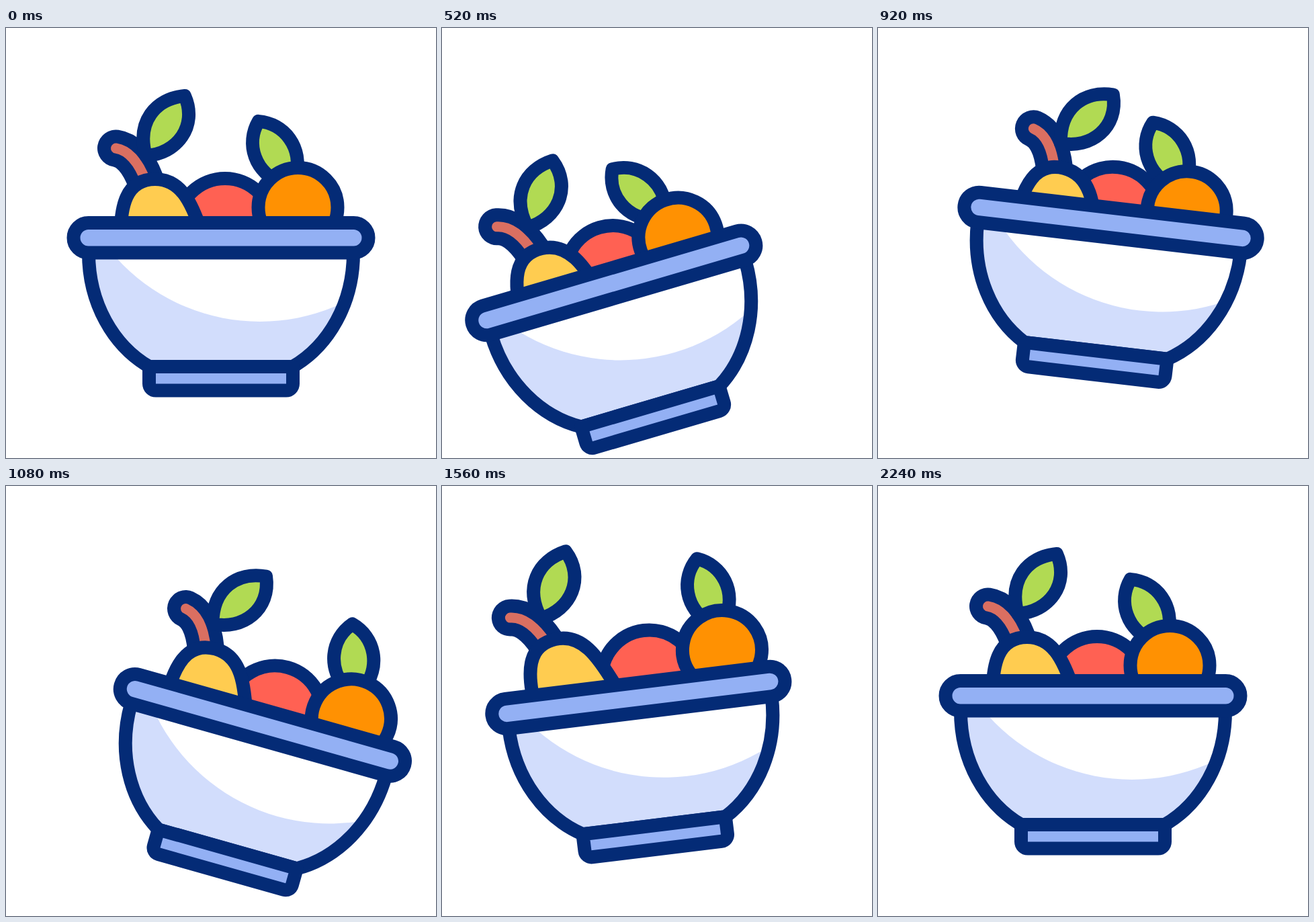
An HTML page that plays this animation: 640x640 px, repeating every 2400 ms.

```html
<!DOCTYPE html>
<html lang="en">
<head>
<meta charset="utf-8">
<title>Fruit bowl</title>
<style>
  html, body { margin: 0; width: 100%; height: 100%; overflow: hidden; background: #fff; }
  svg { display: block; width: 100%; height: 100%; }
  .line { stroke: #042b76; stroke-width: 20; stroke-linejoin: round; }
  .stem { fill: none; stroke-linecap: round; }
  .leaf { fill: #b1da53; }
  .trim { fill: #93b0f4; }
</style>
</head>
<body>
<svg viewBox="0 0 640 640">
  <defs>
    <path id="body" d="M123 325V335C123 410 160 473 213 504H427C480 473 517 410 517 335V325Z"/>
    <path id="twig" d="M163.500 179C182 182 197 199 208 228"/>
    <clipPath id="inside"><use href="#body"/></clipPath>
  </defs>
  <g id="bowl">
    <g id="apple"><circle class="line" cx="326" cy="295" r="71" fill="#ff6153"/></g>
    <g id="pear">
      <use href="#twig" class="stem" stroke="#042b76" stroke-width="55"/>
      <use href="#twig" class="stem" stroke="#da6f61" stroke-width="15"/>
      <path class="line leaf" d="M266 101C222 105 194 140 208 190C254 188 286 146 266 101Z"/>
      <path class="line" fill="#ffcc50" d="M171 325C168 262 180 225 222 225C262 225 278 262 296 318V325Z"/>
    </g>
    <g id="orange">
      <path class="line leaf" transform="translate(434 267) rotate(-27.700) translate(8 -140.500)"
        d="M0 0C-32 20-42 65-10 100H10C42 65 32 20 0 0Z"/>
      <circle class="line" cx="434.500" cy="267" r="59" fill="#ff9102"/>
    </g>
    <use href="#body" fill="#d2ddfc"/>
    <circle cx="378" cy="149" r="288" fill="#fff" clip-path="url(#inside)"/>
    <use href="#body" class="line" fill="none"/>
    <path class="line trim" d="M213 504V529.500A10 10 0 0 0 223 539.500H417A10 10 0 0 0 427 529.500V504Z"/>
    <rect class="line trim" x="100.500" y="290" width="439" height="44.500" rx="22.200"/>
  </g>
</svg>
<script>
  const LOOP = 2400, STEP = 40;

  // Each row: time in ms, then the values reached at that time.
  const tilt = [[200, 0], [600, -18.1], [1090, 15.8], [1470, -8.4], [1885, 4.4], [2240, 0]];
  const drop = [[200, 0], [481, 62.5], [793, -58.5], [1100, 36], [1365, -23], [1770, 28], [2060, 0]];

  // Fruit sinks, is tossed up, then settles: x, y, turn.
  const toss = (low, high) => [[360, 0, 0, 0], [760, ...low], [1320, ...high], [2080, 0, 0, 0]];
  const fruits = [
    { id: "apple", at: [326, 295], keys: toss([-9.5, 9, 0], [17.5, -13, 0]) },
    { id: "pear", at: [222, 275], keys: toss([18.5, 22, 11], [-12, -18.5, -7.5]) },
    { id: "orange", at: [434, 267], keys: toss([-10.5, 21, -8.6], [23, -13, 21]) }
  ];

  function valuesAt(keys, t) {
    const next = keys.findIndex(k => k[0] > t);
    if (next === 0) return keys[0].slice(1);
    if (next < 0) return keys[keys.length - 1].slice(1);
    const a = keys[next - 1], b = keys[next];
    const p = (1 - Math.cos(Math.PI * (t - a[0]) / (b[0] - a[0]))) / 2;
    return a.slice(1).map((v, i) => v + (b[i + 1] - v) * p);
  }

  function place(id, x, y, turn, cx, cy) {
    document.getElementById(id)
      .setAttribute("transform", `translate(${x} ${y}) rotate(${turn} ${cx} ${cy})`);
  }

  function draw() {
    const t = Math.floor(performance.now() % LOOP / STEP) * STEP;
    place("bowl", 0, valuesAt(drop, t)[0], valuesAt(tilt, t)[0], 320, 540);
    for (const { id, at, keys } of fruits) place(id, ...valuesAt(keys, t), ...at);
    requestAnimationFrame(draw);
  }
  draw();
</script>
</body>
</html>
```
